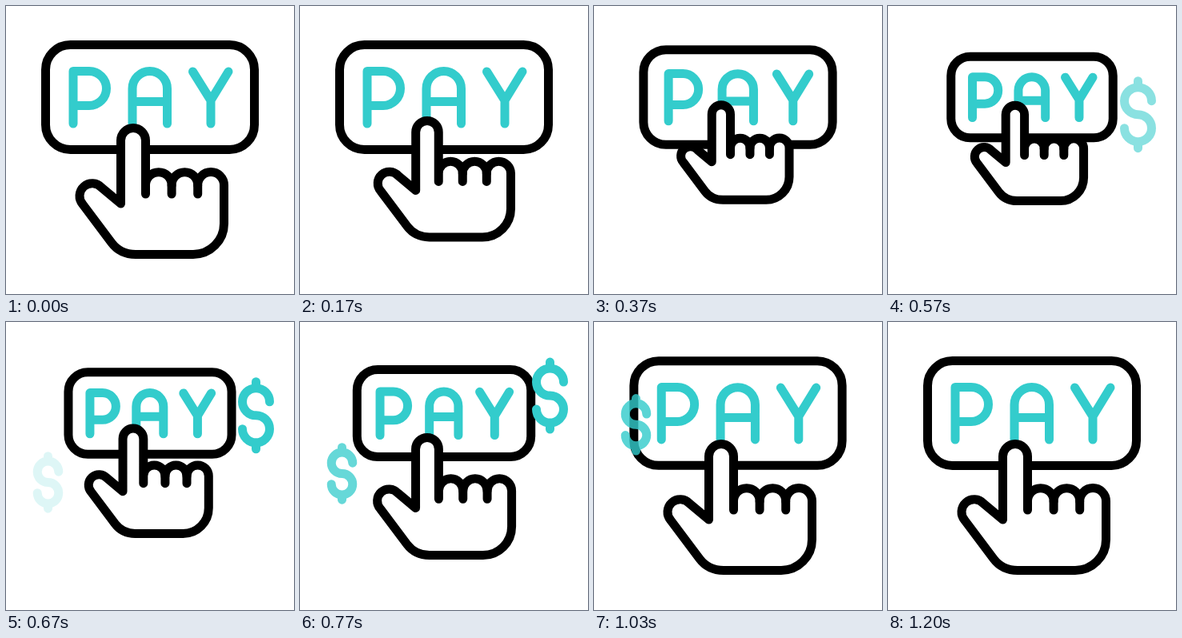
These frames come from a looping animation (360 by 360 pixels, 1400 ms). An HTML page:

```html
<!DOCTYPE html>
<html lang="en">
<head>
<meta charset="utf-8">
<title>Pay button</title>
<style>
  html, body { margin: 0; height: 100%; overflow: hidden; background: #fff; }
  svg { display: block; width: 100vw; height: 100vh; }
  path, rect {
    fill: none;
    stroke-width: 11;
    stroke-linecap: round;
    stroke-linejoin: round;
    vector-effect: non-scaling-stroke;
  }
  .ink { stroke: #000; }
  .solid { fill: #fff; }
  .teal { stroke: #33cccc; }
</style>
</head>
<body>
<svg viewBox="0 0 360 360">
  <defs>
    <path id="dollar" class="teal" d="M17-17A17 17 0 1 0 0 0A17 17 0 1 1-17 17M0-42V-34M0 34V42"/>
  </defs>
  <g id="button">
    <rect class="ink solid" x="49.5" y="48.5" width="261" height="131" rx="31"/>
    <path class="teal" d="M84 147V81.5H104A21.5 21.5 0 0 1 104 124.5H84"/>
    <path class="teal" d="M158 147V103.3A21.75 21.75 0 0 1 201.5 103.3V147M158 119.5H201.5"/>
    <path class="teal" d="M233.5 82L256 118L278 82M256 118V147"/>
  </g>
  <g id="hand">
    <path class="ink solid" d="M174.5 235V168A15.5 15.5 0 0 0 143.5 168V247L119.5 227A15.5 15.5 0 0 0 96 248L132 296Q143 310.5 162 310.5H234A38.5 38.5 0 0 0 272.5 272V224A16.4 16.4 0 0 0 239.7 224A16.3 16.3 0 0 0 207.1 224A16.3 16.3 0 0 0 174.5 224"/>
    <path class="ink" d="M207.1 224V235M239.7 224V235"/>
  </g>
  <use id="right" href="#dollar"/>
  <use id="left" href="#dollar"/>
</svg>
<script>
const LOOP = 1400, STEP = 1000 / 30, FADE = 170;
const el = id => document.getElementById(id);
const clamp = v => Math.min(1, Math.max(0, v));
const ease = (t, from, to) => (1 - Math.cos(Math.PI * clamp((t - from) / (to - from)))) / 2;

// Shrinks about a fixed point, rests, then grows back
const presses = [
  { node: el('button'), x: 180, y: 114, depth: 0.226, times: [185, 590, 612, 1065] },
  { node: el('hand'), x: 158.5, y: 37.3, depth: 0.26, times: [18, 418, 505, 905] }
];

// Drifts upward, fading in and out
const coins = [
  { node: el('right'), x: 312.5, from: 142.5, to: 57.5, size: 1, start: 470, end: 1000 },
  { node: el('left'), x: 52.5, from: 201, to: 115, size: 0.78, start: 640, end: 1170 }
];

function draw(t) {
  for (const { node, x, y, depth, times: [a, b, c, d] } of presses) {
    const s = 1 - depth * (ease(t, a, b) - ease(t, c, d));
    node.setAttribute('transform', `translate(${x} ${y}) scale(${s}) translate(${-x} ${-y})`);
  }
  for (const { node, x, from, to, size, start, end } of coins) {
    const y = from + (to - from) * ease(t, start, end);
    node.setAttribute('transform', `translate(${x} ${y}) scale(${size})`);
    node.setAttribute('opacity', clamp(Math.min(t - start, end - t) / FADE));
  }
}

function tick() {
  const t = performance.now() % LOOP;
  draw(Math.floor((t + 3.4) / STEP) * STEP % LOOP);
  requestAnimationFrame(tick);
}
tick();
</script>
</body>
</html>
```
